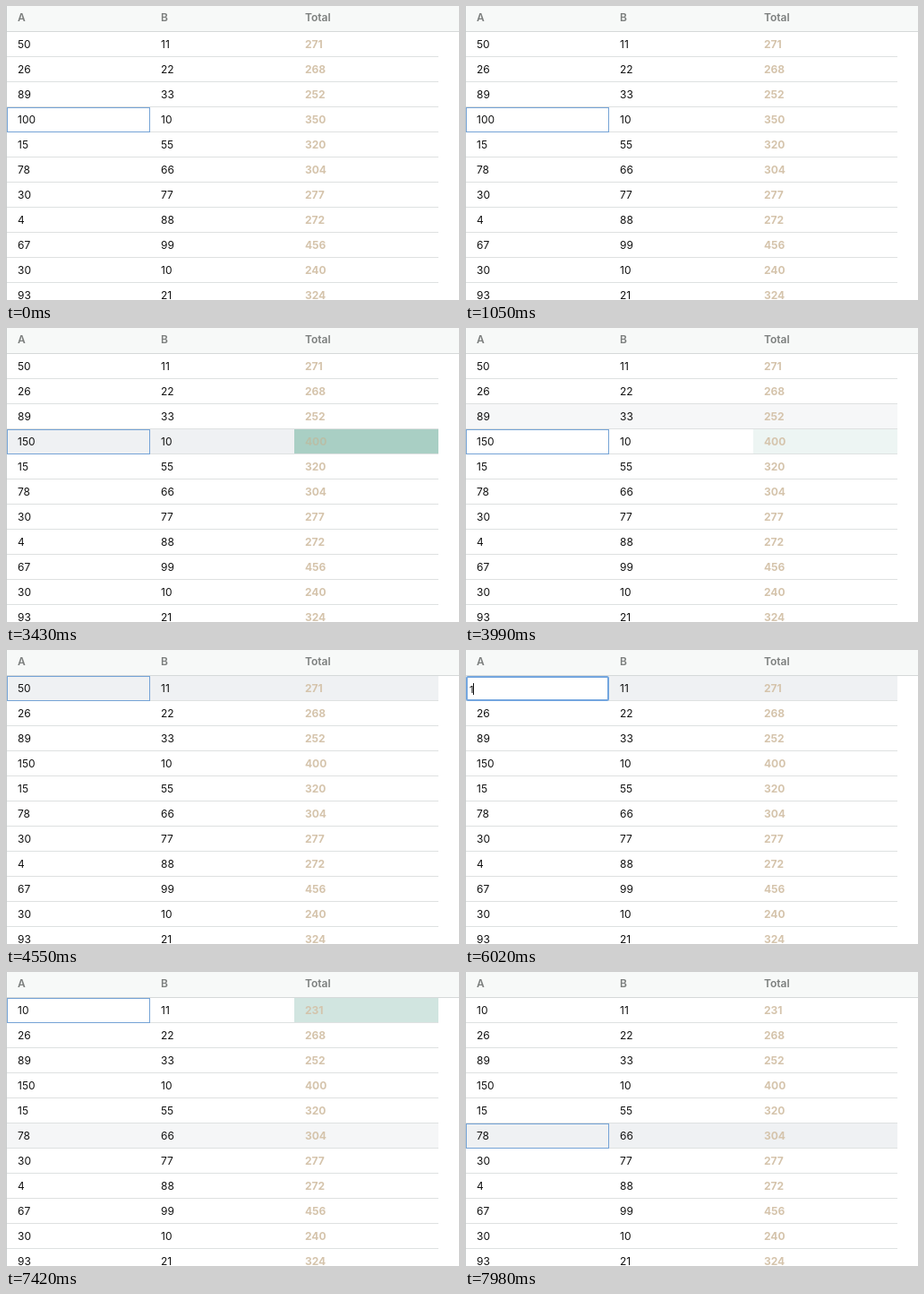
Recreate the animation shown at these times as an HTML page. Size 506 by 328 pixels, loop 8 s.

```html
<!DOCTYPE html>
<html lang="en">
<head>
<meta charset="utf-8">
<title>Editable table</title>
<style>
html, body { margin: 0; width: 100%; height: 100%; overflow: hidden; background: #fff; }
svg { display: block; width: 506px; height: 328px; font: 12px Inter, Roboto, sans-serif; }
.head { font-weight: 600; fill: #7b7e7d; }
.total { font-weight: 700; }
</style>
</head>
<body>
<svg id="stage" viewBox="0 0 506 328"></svg>
<script>
const LOOP = 8000, TOP = 29, ROW = 28, COLS = [13, 173, 334];
const A = [50, 26, 89, 100, 15, 78, 30, 4, 67, 30, 93];
const B = [11, 22, 33, 10, 55, 66, 77, 88, 99, 10, 21];
const TOTAL = [271, 268, 252, 350, 320, 304, 277, 272, 456, 240, 324];

const FOCUS = [[0, 3], [4480, 0], [7840, 5]];
const HOVERS = [
  { row: 3, from: 1120, to: 3920 },
  { row: 2, from: 3920, to: 4060 },
  { row: 1, from: 4060, to: 4200 },
  { row: 0, from: 4200, to: 7280 },
  { row: 5, from: 7340, to: 9000 }
];
const EDITS = [
  { row: 3, open: 1890, done: 3220, value: 150, total: 400,
    keys: [[2380, '1'], [2590, '15'], [2800, '150']] },
  { row: 0, open: 5250, done: 6790, value: 10, total: 231,
    keys: [[5810, '1'], [6300, '10']] }
];

const stage = document.getElementById('stage');

function add(tag, attrs, text) {
  const el = document.createElementNS('http://www.w3.org/2000/svg', tag);
  for (const k in attrs) el.setAttribute(k, attrs[k]);
  if (text !== undefined) el.textContent = text;
  return stage.appendChild(el);
}
const rect = (x, y, width, height, fill, more) => add('rect', { x, y, width, height, fill, ...more });
const label = (x, y, text, more) => add('text', { x, y, ...more }, text);
const set = (el, k, v) => el.setAttribute(k, v);
const show = (el, on) => set(el, 'visibility', on ? 'visible' : 'hidden');
const clamp = v => Math.max(0, Math.min(1, v));
const rowY = i => TOP + ROW * i;
const lastOf = (list, t) => list.filter(([at]) => at <= t).pop();
const mix = (a, b, k) => `rgb(${a.map((v, i) => Math.round(v + (b[i] - v) * k))})`;

// CSS "ease" curve, solved for x by bisection
function ease(x) {
  const curve = (a, b, s) => 3 * a * s * (1 - s) ** 2 + 3 * b * s * s * (1 - s) + s ** 3;
  let lo = 0, hi = 1;
  for (let i = 0; i < 20; i++) {
    const mid = (lo + hi) / 2;
    if (curve(0.25, 0.25, mid) < x) lo = mid; else hi = mid;
  }
  return curve(0.1, 1, lo);
}

function flashAt(t, done) {
  return t < done ? 0 : 1 - ease(clamp((t - done - 450) / 650));
}

rect(0, 0, 506, 328, '#fff');
rect(0, 0, 506, 28, '#f7f9f8');
rect(0, 28, 506, 1, '#d5d9d9');
['A', 'B', 'Total'].forEach((name, i) => label(COLS[i], 17, name, { class: 'head' }));

const rows = A.map((a, i) => {
  const y = rowY(i);
  const hover = rect(1, y, 482, ROW - 1, '#eff1f3');
  const flash = rect(322, y, 161, ROW - 1, '#a9cfc4');
  rect(1, y + ROW - 1, 482, 1, '#dee1e1');
  return {
    hover, flash,
    a: label(COLS[0], y + 18, a, { fill: '#111' }),
    b: label(COLS[1], y + 18, B[i], { fill: '#111' }),
    total: label(COLS[2], y + 18, TOTAL[i], { class: 'total' })
  };
});

rect(0, 0, 1, 328, '#c9cccc');
const focus = rect(1.5, 0, 159, 27, 'none', { stroke: '#75a3d6' });
const box = rect(2, 0, 158, 26, '#fff', { stroke: '#73a6df', 'stroke-width': 2, rx: 1.5 });
const selection = rect(5, 0, 19, 13, '#b3cfeb');
const input = label(5, 0, '', { fill: '#111', 'font-size': 11 });
const caret = rect(0, 0, 1, 13, '#111');

function render(t) {
  rows.forEach((r, i) => {
    const edit = EDITS.find(e => e.row === i);
    const done = edit && t >= edit.done;
    const flash = edit ? flashAt(t, edit.done) : 0;
    const h = HOVERS.find(v => v.row === i && t >= v.from && t < v.to);
    set(r.hover, 'opacity', h ? clamp((t - h.from) / 130) : 0);
    set(r.flash, 'opacity', flash);
    r.a.textContent = done ? edit.value : A[i];
    r.total.textContent = done ? edit.total : TOTAL[i];
    set(r.total, 'fill', mix([213, 196, 172], [185, 190, 166], clamp(flash * 2 - 1)));
  });

  const edit = EDITS.find(e => t >= e.open && t < e.done);
  const y = rowY(edit ? edit.row : lastOf(FOCUS, t)[1]);
  const key = edit && lastOf(edit.keys, t);
  show(focus, !edit);
  set(focus, 'y', y + 0.5);
  for (const el of [box, input]) show(el, edit);
  show(selection, edit && !key);
  show(caret, key && (t - key[0]) % 1000 < 500);
  if (!edit) return;

  set(box, 'y', y + 1);
  set(selection, 'y', y + 8);
  set(input, 'y', y + 19);
  set(caret, 'y', y + 8);
  input.textContent = key ? key[1] : A[edit.row];
  const width = input.getComputedTextLength();
  set(selection, 'width', width);
  set(caret, 'x', Math.round(5 + width));
  show(rows[edit.row].a, true);
}

const start = performance.now();
function tick() {
  render((performance.now() - start) % LOOP);
  requestAnimationFrame(tick);
}
tick();
</script>
</body>
</html>
```
